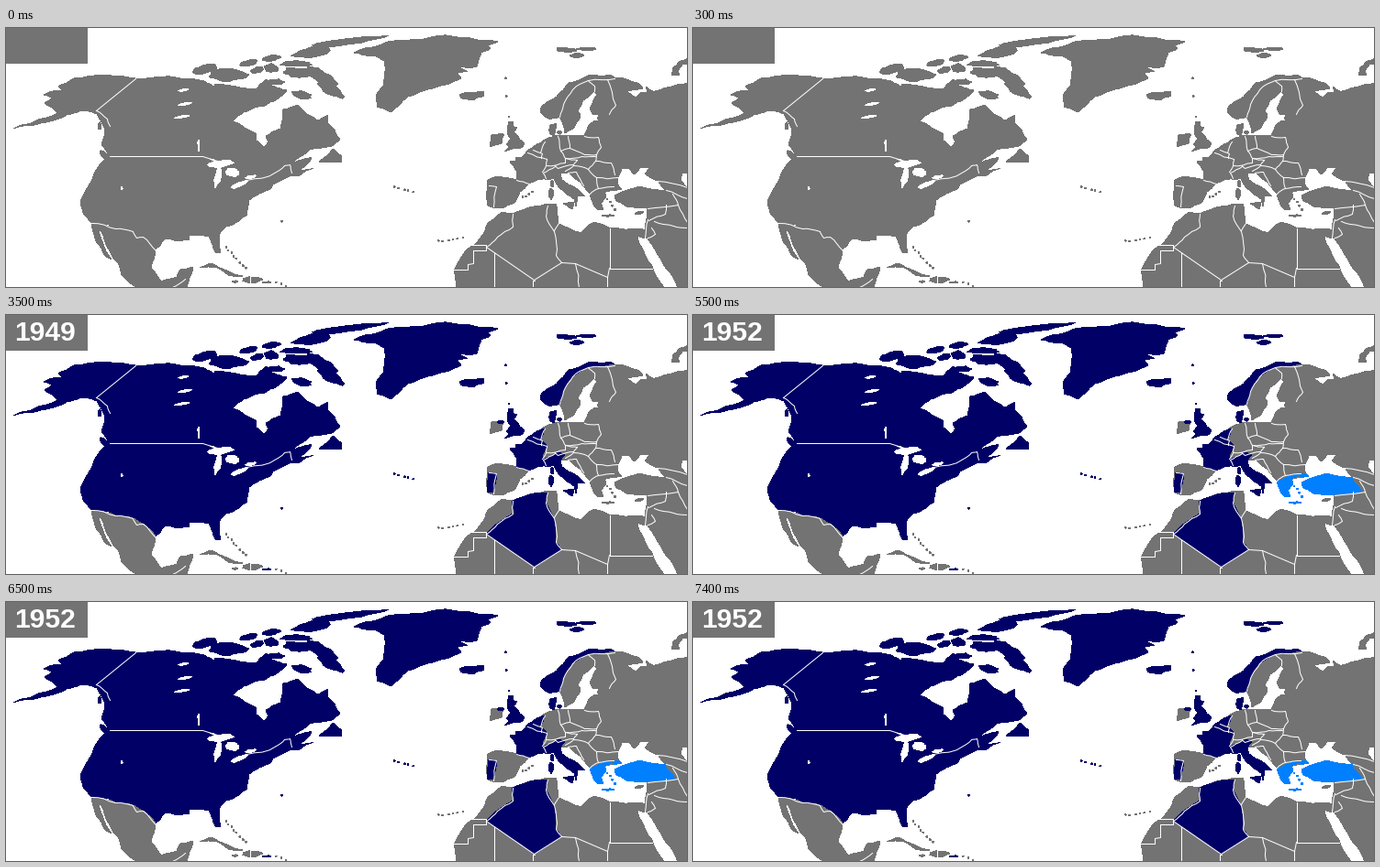
These frames come from a looping animation (742x283 px, 8000 ms). A matplotlib script:

```python
import numpy as np
import matplotlib.pyplot as plt
from matplotlib.animation import FuncAnimation
from matplotlib.patches import Polygon, Rectangle

W, H, DPI = 742, 283, 100
PX = 72 / DPI
GREY, NAVY, BLUE, SEA = "#737373", "#000066", "#0080ff", "white"
STEP = 500

plt.rcParams["toolbar"] = "None"
rng = np.random.default_rng(7)
fig = plt.figure(figsize=(W / DPI, H / DPI), dpi=DPI, facecolor=SEA)
ax = fig.add_axes([0, 0, 1, 1])
ax.set_xlim(0, W)
ax.set_ylim(H, 0)
ax.axis("off")

founders, joiners = [], []


def rough(pts, amp, rounds=2):
    """Split each segment and push its middle sideways by a random share."""
    for _ in range(rounds):
        a, d = pts[:-1], np.diff(pts, axis=0)
        push = rng.uniform(-amp, amp, (len(d), 1))
        mid = a + d / 2 + push * d[:, ::-1] * [-1, 1]
        pts = np.vstack([np.stack([a, mid], 1).reshape(-1, 2), pts[-1:]])
    return pts


def fill(pts, color=GREY, group=None):
    patch = Polygon(pts, facecolor=color, edgecolor="none", antialiased=False,
                    zorder=1 + len(ax.patches) * 0.001)
    ax.add_patch(patch)
    if group is not None:
        group.append(patch)


def land(*xy, group=None, amp=0.07):
    pts = np.reshape(xy, (-1, 2)).astype(float)
    fill(rough(np.vstack([pts, pts[:1]]), amp), group=group)


def member(*xy):
    land(*xy, group=founders)


def joiner(*xy):
    land(*xy, group=joiners)


def blob(x, y, w, h, tilt=0, color=GREY, group=None):
    """Ragged ellipse; positive tilt lifts the right end."""
    t = np.linspace(0, 2 * np.pi, 16, endpoint=False)
    r = rng.uniform(0.8, 1.15, t.size) / 2
    z = (w * r * np.cos(t) + 1j * h * r * np.sin(t)) * np.exp(-1j * np.radians(tilt))
    fill(np.c_[x + z.real, y + z.imag], color, group)


def lake(*spec):
    blob(*spec, color=SEA)


def chain(x0, y0, x1, y1, n, group=None):
    """Row of tiny islands."""
    for x, y in np.linspace((x0, y0), (x1, y1), n) + rng.uniform(-1, 1, (n, 2)):
        blob(x, y, 1.5, 1.5, group=group)


def border(*xy, amp=0.07):
    x, y = rough(np.reshape(xy, (-1, 2)) + 0.5, amp).T
    ax.plot(x, y, color=SEA, lw=PX, zorder=2)


def straight(*xy):
    border(*xy, amp=0)


# Alaska and Canada west of Hudson Bay
member(8, 110, 44, 98, 56, 93, 50, 87, 42, 82, 52, 77, 41, 73, 62, 68, 57, 64, 76, 54,
       108, 51, 141, 55, 190, 55, 216, 58, 228, 65, 229, 143, 113, 141, 104, 128,
       108, 111, 99, 94, 81, 90, 66, 95, 38, 104)
# Canada around and east of Hudson Bay
member(227, 62, 251, 64, 272, 67, 284, 56, 290, 63, 306, 68, 295, 78, 282, 85, 259, 92,
       247, 102, 272, 115, 273, 123, 281, 131, 286, 124, 283, 118, 299, 110, 302, 89,
       318, 84, 328, 94, 340, 101, 351, 95, 350, 104, 364, 122, 355, 129, 331, 133,
       311, 148, 325, 143, 333, 141, 329, 148, 310, 161, 264, 174, 246, 172, 227, 143)
# United States
member(113, 140, 214, 140, 246, 153, 250, 170, 294, 157, 303, 150, 310, 150, 311, 158,
       291, 171, 288, 176, 265, 188, 263, 204, 240, 217, 232, 226, 234, 246, 229, 246,
       221, 228, 199, 227, 200, 232, 173, 230, 162, 242, 142, 229, 112, 215, 93, 213,
       84, 202, 82, 187, 103, 148)
# Mexico and the Caribbean
land(101, 214, 119, 219, 138, 222, 149, 228, 163, 242, 158, 262, 169, 277, 186, 272,
     190, 264, 204, 261, 197, 283, 146, 285, 126, 270, 122, 257, 106, 227)
land(93, 213, 101, 215, 106, 236, 115, 253, 109, 250, 98, 233)
land(211, 262, 224, 257, 258, 271, 243, 271, 230, 262)
blob(268, 275, 20, 7)
blob(249, 277, 7, 2)
blob(284, 278, 8, 2, group=founders)
chain(239, 240, 261, 262, 8)
chain(294, 278, 305, 282, 3)
# Newfoundland, Nova Scotia, Pacific coast
member(341, 146, 356, 132, 366, 140, 365, 147)
member(309, 161, 318, 155, 335, 153, 318, 162)
blob(107, 139, 15, 5, -45, group=founders)
blob(102, 107, 3, 8, group=founders)
# Arctic archipelago: x, y, width, height, tilt
for isle in [(217, 45, 28, 9, 15), (242, 51, 42, 14, 0), (274, 46, 15, 6, 10),
             (289, 44, 15, 9, 0), (265, 38, 20, 6, 15), (289, 33, 20, 6, 10),
             (316, 39, 34, 6, 0), (370, 15, 82, 7, 8), (334, 27, 44, 10, 8),
             (319, 49, 34, 10, -5), (344, 54, 38, 13, -30), (354, 67, 30, 11, -30),
             (322, 73, 22, 8, -10), (293, 59, 19, 6, 0)]:
    blob(*isle, group=founders)
# Lakes
for spec in [(234, 148, 28, 7, 8), (231, 163, 7, 21, -15), (247, 158, 16, 9, -10),
             (254, 171, 19, 4, 25), (266, 163, 11, 3, 15), (210, 128, 2, 12, 0),
             (192, 97, 15, 2, 8), (195, 83, 15, 2, 10), (193, 68, 11, 2, 8),
             (126, 175, 2, 2, 0)]:
    lake(*spec)
# Greenland, Iceland, Svalbard and Atlantic islands
member(379, 27, 409, 18, 440, 13, 492, 10, 536, 15, 524, 19, 528, 22, 518, 27, 513, 42,
       494, 43, 503, 48, 491, 48, 496, 55, 465, 66, 438, 75, 419, 92, 404, 86,
       404, 72, 411, 63, 412, 36, 401, 30)
member(494, 73, 499, 71, 520, 69, 521, 74, 508, 79, 498, 78)
for isle in [(611, 24, 22, 5, -5), (633, 23, 20, 3, 0), (622, 30, 14, 5, 0)]:
    blob(*isle, group=founders)
chain(423, 174, 444, 179, 5, founders)
chain(545, 54, 547, 97, 3, founders)
chain(301, 211, 301, 211, 1, founders)
chain(471, 233, 498, 229, 6)

# British Isles
land(529, 117, 541, 115, 540, 126, 527, 130)
blob(539, 117, 6, 4, group=founders)
member(547, 103, 553, 103, 552, 107, 557, 109, 553, 113, 560, 122, 565, 126, 561, 131,
       543, 135, 549, 130, 545, 127, 551, 121, 547, 117)
# Scandinavia
land(603, 96, 609, 78, 625, 61, 634, 58, 641, 68, 629, 79, 623, 90, 626, 97, 619, 109,
     609, 115)
member(582, 91, 584, 85, 600, 75, 613, 60, 634, 52, 660, 52, 663, 55, 634, 57, 617, 67,
       607, 83, 603, 97, 591, 99)
member(592, 107, 600, 104, 597, 118, 593, 116)
blob(603, 114, 4, 4, group=founders)
# Eastern Europe with the Baltic, White and Black Sea coasts
land(634, 58, 662, 54, 688, 60, 694, 66, 676, 69, 686, 76, 692, 70, 699, 70, 697, 64,
     706, 70, 716, 66, 750, 59, 750, 157, 737, 158, 735, 166, 750, 188, 719, 178,
     711, 168, 696, 159, 702, 152, 692, 152, 684, 160, 679, 154, 671, 154, 666, 166,
     668, 175, 636, 181, 613, 158, 584, 158, 576, 138, 585, 123, 598, 118, 630, 118,
     637, 104, 645, 101, 645, 96, 658, 94, 640, 95, 636, 88, 644, 73)
land(750, 33, 735, 36, 727, 43, 725, 51, 734, 52, 732, 47, 737, 40, 750, 37)
# Western Europe
land(525, 166, 532, 163, 556, 166, 570, 170, 560, 179, 554, 191, 540, 197, 525, 194)
member(526, 172, 534, 173, 531, 194, 525, 194, 524, 187)
member(549, 146, 556, 145, 555, 141, 562, 141, 577, 128, 587, 124, 582, 137, 589, 143,
       584, 155, 588, 164, 569, 170, 556, 166, 557, 157)
# Italy and the western Mediterranean
member(586, 158, 601, 150, 609, 153, 604, 159, 606, 166, 631, 184, 623, 184, 621, 195,
       619, 187, 602, 174, 597, 165, 587, 165)
member(607, 192, 619, 191, 617, 198)
blob(594, 181, 5, 11, group=founders)
blob(595, 170, 3, 7, group=founders)
chain(562, 185, 574, 180, 4)
# Greece, Turkey, Cyprus
joiner(636, 181, 652, 175, 661, 174, 652, 179, 654, 184, 648, 191, 651, 199, 644, 198,
       637, 185)
joiner(661, 174, 667, 173, 671, 176, 661, 178)
joiner(663, 183, 690, 173, 721, 177, 728, 189, 732, 193, 699, 197, 676, 195, 665, 189)
blob(656, 205, 12, 2, group=joiners)
chain(656, 187, 664, 198, 4, joiners)
blob(690, 202, 9, 3, 15)
# Middle East and Africa
land(719, 178, 750, 188, 750, 290, 736, 290, 718, 261, 699, 230, 695, 228, 699, 197,
     732, 193)
land(541, 201, 552, 203, 575, 195, 599, 192, 601, 213, 627, 224, 634, 216, 641, 212,
     657, 218, 694, 220, 696, 230, 688, 227, 691, 237, 704, 260, 720, 290, 490, 290,
     488, 265, 501, 243, 517, 229, 525, 213)
land(552, 203, 575, 195, 590, 194, 588, 205, 597, 222, 599, 248, 605, 256, 575, 275,
     523, 239, 535, 228, 552, 217, group=founders, amp=0.02)

# North American borders
straight(141, 55, 98, 90)
border(98, 90, 110, 99, 113, 107)
straight(113, 140, 214, 140, 230, 145)
border(262, 166, 294, 157, 303, 150, 309, 149, 311, 158)
border(93, 213, 119, 219, 138, 222, 142, 229, 149, 228, 163, 243)
border(181, 283, 195, 274)
straight(265, 271, 265, 279)
# Nordic and eastern borders
border(603, 97, 607, 83, 617, 67, 634, 57, 663, 55)
border(634, 57, 641, 63, 641, 69)
border(655, 56, 664, 84, 657, 94)
border(612, 118, 614, 131, 630, 138, 643, 138, 648, 130, 645, 119, 630, 118)
border(601, 118, 604, 134, 613, 131)
border(604, 134, 609, 142, 627, 140, 642, 140)
border(643, 138, 642, 145, 659, 147, 663, 160)
# Central Europe and the Balkans
border(584, 157, 588, 150, 609, 147, 609, 142, 622, 144)
border(589, 143, 588, 150)
border(598, 150, 601, 153, 618, 149, 622, 144)
border(609, 156, 618, 150, 634, 154, 642, 145)
border(634, 154, 643, 163, 667, 163)
border(643, 163, 645, 175, 636, 181)
border(645, 175, 662, 173)
border(612, 158, 621, 157, 629, 172)
border(568, 136, 589, 143)
border(574, 133, 584, 137, 583, 142)
border(587, 124, 582, 136)
border(556, 166, 570, 170)
border(588, 164, 585, 158, 598, 151)
border(526, 172, 534, 173, 531, 195)
# Caucasus and Middle East
border(709, 167, 742, 174)
border(719, 177, 742, 186)
border(726, 181, 732, 193, 699, 197)
border(732, 193, 742, 212)
border(719, 193, 718, 203, 700, 210)
border(706, 211, 727, 216, 742, 218)
border(699, 209, 696, 229)
border(699, 229, 707, 225, 703, 218)
# African borders
border(590, 194, 588, 205, 597, 222, 599, 248, 605, 256)
straight(605, 256, 575, 275, 523, 239)
border(523, 239, 535, 228, 552, 217, 552, 203)
border(597, 221, 602, 213)
straight(506, 237, 523, 237, 523, 243, 509, 243, 509, 257, 503, 258, 503, 264, 488, 264)
straight(531, 283, 531, 245)
straight(575, 275, 573, 275, 573, 283)
straight(605, 256, 620, 257, 655, 272)
border(620, 257, 624, 283)
straight(657, 218, 657, 262, 703, 262)
straight(657, 262, 655, 272, 655, 283)

ax.add_patch(Rectangle((0, 0), 89, 39, color=GREY, lw=0, zorder=3))
year = ax.text(9, 28.5, "", color="white", family="Liberation Sans", weight="bold",
               size=30 * PX, va="baseline", ha="left", zorder=4)


def paint(group, color):
    for patch in group:
        patch.set_facecolor(color)


def update(i):
    t = i * STEP
    paint(founders, NAVY if t >= 500 else GREY)
    lit = 5500 <= t < 6000 or t >= 6500
    paint(joiners, BLUE if lit else GREY)
    year.set_text("" if t < 500 else "1949" if t < 5500 else "1952")
    return [*founders, *joiners, year]


anim = FuncAnimation(fig, update, frames=16, interval=STEP, repeat=True,
                     repeat_delay=0, blit=False)
plt.show()
```
